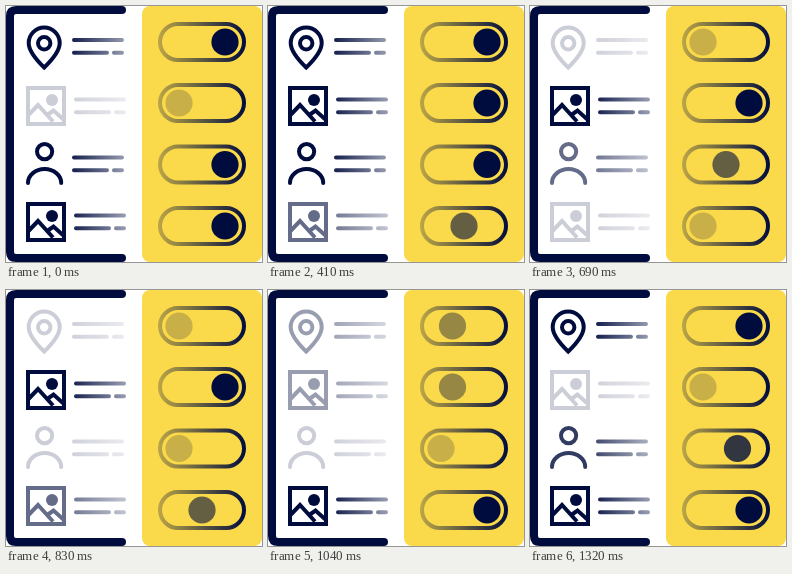
Recreate the animation shown at these times as an HTML page. Size 256 by 256 pixels, loop 1390 ms.

```html
<!DOCTYPE html>
<html lang="en">
<head>
<meta charset="utf-8">
<title>Toggles</title>
<style>
  html, body { margin: 0; width: 100%; height: 100%; overflow: hidden; background: #fff; }
  svg { display: block; width: 100vw; height: 100vh; }
</style>
</head>
<body>
<svg id="stage" viewBox="0 0 256 256">
  <defs>
    <linearGradient id="lineFade" gradientUnits="userSpaceOnUse" x1="66" y1="0" x2="120" y2="0">
      <stop offset="0" stop-color="#000c3d" stop-opacity=".92"/>
      <stop offset="1" stop-color="#000c3d" stop-opacity=".4"/>
    </linearGradient>
    <linearGradient id="pillFade" gradientUnits="userSpaceOnUse" x1="152" y1="0" x2="240" y2="0">
      <stop offset="0" stop-color="#000c3d" stop-opacity=".25"/>
      <stop offset="1" stop-color="#000c3d"/>
    </linearGradient>
    <g id="pin">
      <path d="M38.2 61.5C33 56.5 22.7 46.5 22.7 37A15.5 15.5 0 0 1 53.7 37C53.7 46.5 43.4 56.5 38.2 61.5Z"/>
      <circle cx="38.2" cy="37.3" r="6.2"/>
    </g>
    <g id="picture">
      <rect x="22" y="82" width="36" height="36"/>
      <path d="M22 109.5L32 99L47 115.5M40.5 109.5L47.5 104.5L58 114"/>
      <circle cx="46" cy="94" r="6" fill="#000c3d" stroke="none"/>
    </g>
    <g id="person" stroke-linecap="round">
      <circle cx="38.6" cy="145.6" r="7.6"/>
      <path d="M22 177A16.6 14 0 0 1 55.2 177"/>
    </g>
  </defs>
  <path d="M116 4H10Q4 4 4 10V246Q4 252 10 252H116" fill="none" stroke="#000c3d" stroke-width="8" stroke-linecap="round"/>
  <rect x="136" width="120" height="256" rx="8" fill="#fad94a"/>
  <g id="rows" fill="none" stroke="#000c3d" stroke-width="4"></g>
</svg>
<script>
  const FIRST = 200, STEP = 70, LOOP = 1390, TICKS = 18;
  const NS = "http://www.w3.org/2000/svg";

  // off / on: tick after which the knob starts to slide, four ticks per slide
  const rows = [
    { icon: "pin", dy: 0, x: 68, line: 34, y: 36, off: 4, on: 12 },
    { icon: "picture", dy: 0, x: 70, line: 93.5, y: 97, off: 10, on: 0 },
    { icon: "person", dy: 0, x: 68, line: 151.5, y: 158.5, off: 6, on: 14 },
    { icon: "picture", dy: 116, x: 70, line: 209.5, y: 220, off: 2, on: 8 }
  ];

  function add(parent, tag, attrs) {
    const el = document.createElementNS(NS, tag);
    for (const key in attrs) el.setAttribute(key, attrs[key]);
    return parent.appendChild(el);
  }

  for (const row of rows) {
    const root = document.getElementById("rows");
    const { x, line, y } = row;
    row.item = add(root, "g", {});
    add(row.item, "use", { href: "#" + row.icon, y: row.dy });
    add(row.item, "path", {
      d: `M${x} ${line}h48M${x} ${line + 12.8}h33M${x + 40} ${line + 12.8}h8`,
      stroke: "url(#lineFade)", "stroke-linecap": "round"
    });
    add(root, "rect", { x: 154, y: y - 18, width: 84, height: 36, rx: 18, stroke: "url(#pillFade)" });
    row.knob = add(root, "circle", { cy: y, r: 13.6, fill: "#000c3d", stroke: "none" });
  }

  // 0 is off, 1 is on
  function level(row, tick) {
    const sinceOff = (tick - row.off + TICKS) % TICKS;
    const sinceOn = (tick - row.on + TICKS) % TICKS;
    return sinceOn < sinceOff ? Math.min(sinceOn / 4, 1) : 1 - Math.min(sinceOff / 4, 1);
  }

  function draw(ms) {
    const t = ms % LOOP;
    const tick = t < FIRST ? 0 : 1 + Math.floor((t - FIRST) / STEP);
    for (const row of rows) {
      const v = level(row, tick);
      const alpha = 0.2 + 0.8 * v;
      row.item.setAttribute("opacity", alpha);
      row.knob.setAttribute("opacity", alpha);
      row.knob.setAttribute("cx", 173 + 46 * v);
    }
  }

  const start = performance.now();
  function loop() {
    draw(performance.now() - start);
    requestAnimationFrame(loop);
  }
  loop();
</script>
</body>
</html>
```
